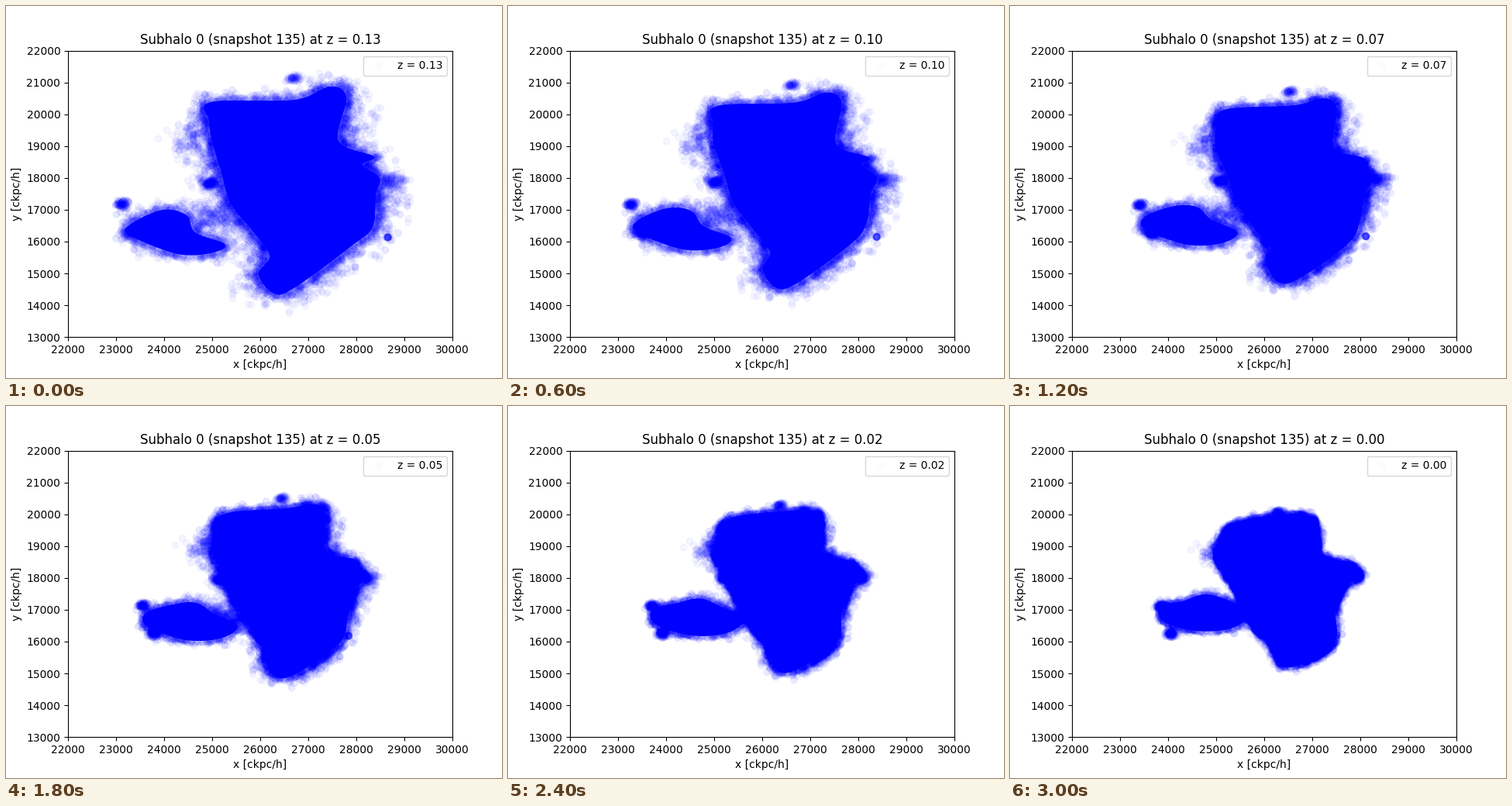
Recreate the animation shown at these times as a matplotlib script. Size 640 by 480 pixels, loop 3600 ms.

```python
import numpy as np
import matplotlib.pyplot as plt
from matplotlib.animation import FuncAnimation
from matplotlib.patches import Polygon

# Whole-pixel glyph advances.
plt.rcParams["text.kerning_factor"] = 6

REDSHIFTS = [0.13, 0.10, 0.07, 0.05, 0.02, 0.00]
STEPS = 30
rng = np.random.default_rng(135)

# Key points in stage pixels, clockwise: x, y at the start, x, y at the end.
HALO = [
    (264, 124, 298, 148), (372, 121, 358, 139), (418, 104, 386, 142),
    (439, 118, 395, 154), (429, 174, 402, 194), (474, 194, 432, 200),
    (460, 205, 444, 206), (482, 222, 452, 221), (477, 245, 431, 234),
    (473, 285, 420, 262), (448, 308, 419, 304), (370, 365, 378, 332),
    (344, 370, 350, 336), (326, 346, 340, 314), (340, 322, 330, 300),
    (318, 290, 314, 286), (290, 255, 296, 250), (277, 212, 284, 223),
    (266, 175, 265, 196), (262, 148, 274, 165),
]
ARM = [
    (160, 296, 198, 278), (160, 282, 193, 258), (202, 263, 222, 252),
    (233, 270, 252, 243), (244, 292, 285, 252), (282, 307, 310, 268),
    (268, 318, 285, 287), (222, 320, 240, 290),
]
# Loose clumps: the same four numbers, then spread and particle count.
CLUMPS = [
    (371, 93, 345, 136, 4, 70), (150, 255, 194, 258, 4, 120),
    (165, 291, 207, 293, 5, 170), (492, 298, 408, 295, 0.6, 25),
    (262, 228, 282, 220, 5, 150), (238, 175, 262, 188, 13, 110),
    (500, 226, 446, 218, 9, 120), (268, 272, 295, 270, 16, 260),
]


def to_data(px):
    """Stage pixels (y down) to axis units."""
    return np.column_stack([22000 + (px[:, 0] - 80) / 496 * 8000,
                            13000 + (427.2 - px[:, 1]) / 369.6 * 9000])


def closed_curve(keys):
    """Closed Catmull-Rom curve through the key points, at start and end."""
    p = np.array(keys, float)
    a, b, c, d = (np.roll(p, k, axis=0)[:, None] for k in (1, 0, -1, -2))
    t = np.linspace(0, 1, STEPS, endpoint=False)[None, :, None]
    curve = (b + t * (c - a) / 2 + t**2 * (a - 2.5 * b + 2 * c - d / 2)
             + t**3 * (1.5 * (b - c) + (d - a) / 2))
    flat = curve.reshape(-1, 4)
    return flat[:, :2], flat[:, 2:]


def tangents(curve):
    return np.roll(curve, -1, axis=0) - np.roll(curve, 1, axis=0)


def outward(curve):
    t = tangents(curve)
    n = np.column_stack([t[:, 1], -t[:, 0]])
    return n / np.maximum(np.hypot(*n.T), 1e-6)[:, None]


def fringe(start, end, reach):
    """Particles thinning out from a rim, widest where it faces sideways."""
    normal = outward(start)
    width = reach * (10 + 20 * np.abs(normal[:, 0]))
    weight = width * np.hypot(*tangents(start).T) / 2
    count = int(0.11 * weight.sum())
    i = np.repeat(rng.choice(len(start), count, p=weight / weight.sum()), 2)
    depth = 0.55 * rng.exponential(size=count) * rng.random(count)
    d = np.repeat(np.minimum(depth, 1.4), 2)[:, None]
    jitter = rng.normal(0, 2, (len(i), 2))
    a = start[i] + normal[i] * d * width[i][:, None] + jitter
    b = end[i] + outward(end)[i] * (6 * d - 1.5) + 0.4 * jitter
    return a, b


def clump(x0, y0, x1, y1, spread, count):
    offset = rng.normal(size=(count, 2)) * (spread, 0.7 * spread)
    return offset + (x0, y0), 0.7 * offset + (x1, y1)


fig, ax = plt.subplots(figsize=(6.4, 4.8), dpi=100)
ax.set(xlim=(22000, 30000), ylim=(13000, 22000),
       xlabel="x [ckpc/h]", ylabel="y [ckpc/h]")

cores, groups = [], [clump(*row) for row in CLUMPS]
for keys, reach in ((HALO, 1), (ARM, 0.7)):
    start, end = closed_curve(keys)
    groups.append(fringe(start, end, reach))
    patch = ax.add_patch(Polygon(to_data(start), color="blue", lw=0))
    cores.append((patch, to_data(start), to_data(end)))

begin = to_data(np.vstack([g[0] for g in groups]))
finish = to_data(np.vstack([g[1] for g in groups]))
dots = ax.scatter(*begin.T, color="blue", alpha=0.04)
key = ax.scatter([], [], color="blue", alpha=0.01, label="z = 0.13")
legend = ax.legend(handles=[key], loc="upper right")


def draw(k):
    t = k / (len(REDSHIFTS) - 1)
    dots.set_offsets(begin + t * (finish - begin))
    for patch, a, b in cores:
        patch.set_xy(a + t * (b - a))
    z = f"z = {REDSHIFTS[k]:.2f}"
    ax.set_title(f"Subhalo 0 (snapshot 135) at {z}")
    legend.get_texts()[0].set_text(z)
    return dots,


anim = FuncAnimation(fig, draw, frames=len(REDSHIFTS), interval=600,
                     repeat=True, repeat_delay=0)
plt.show()
```
